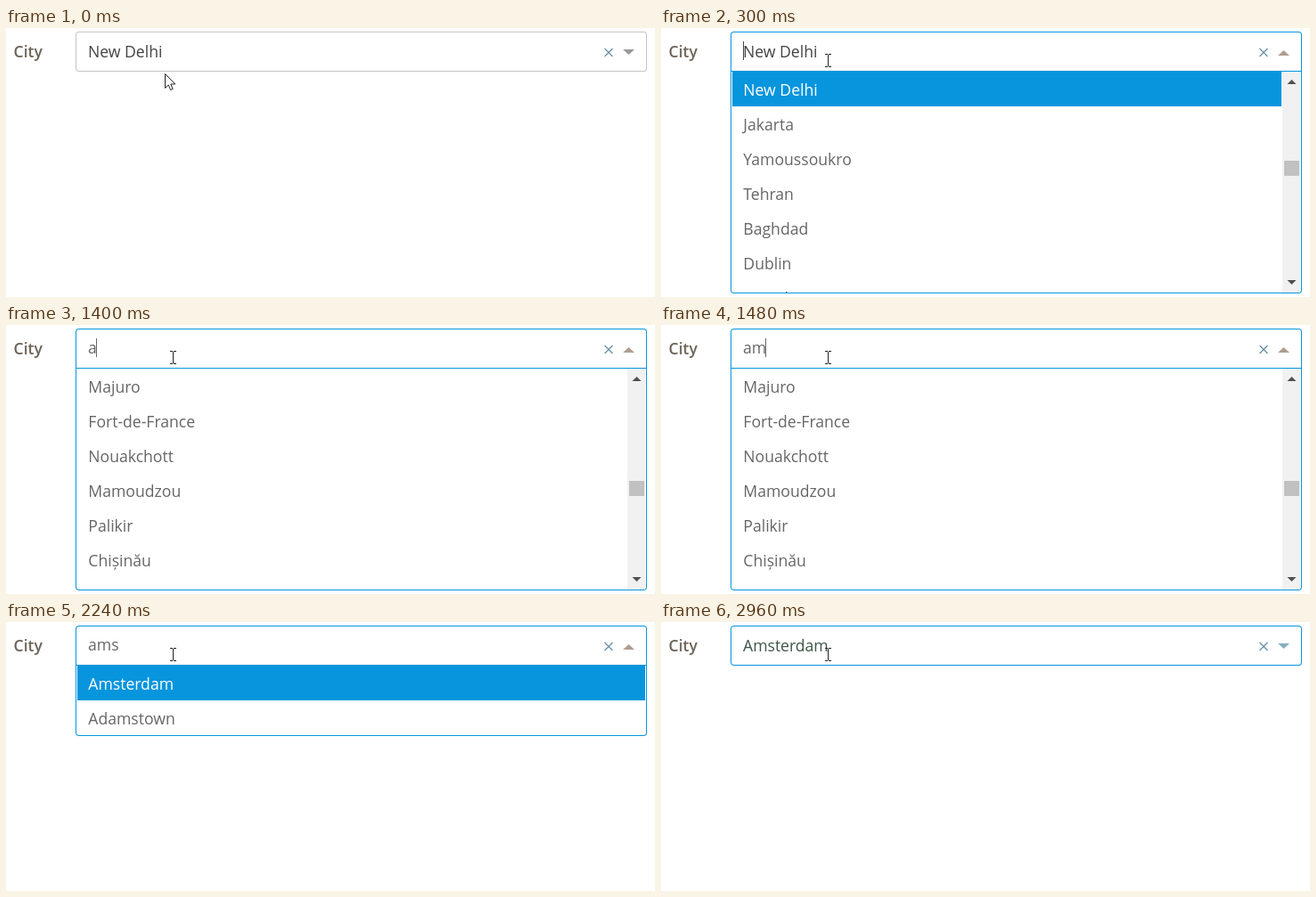
An HTML page with a canvas for the animation above (3.57 s loop, 728 by 302 pixels).

```html
<!DOCTYPE html>
<html lang="en">
<head>
<meta charset="utf-8">
<title>City select</title>
<style>
html, body { margin: 0; height: 100%; overflow: hidden; background: #fff; }
canvas { display: block; }
</style>
</head>
<body>
<canvas width="728" height="302"></canvas>
<script>
const ctx = document.querySelector('canvas').getContext('2d');
const LOOP = 3570;
const BLUE = '#0795dd';
const FONT = '17.6px "Open Sans", sans-serif';
const ROW = 39, LIST_TOP = 49;

const nearby = ['New Delhi', 'Jakarta', 'Yamoussoukro', 'Tehran', 'Baghdad', 'Dublin', 'Zagreb'];
const withA = ['Majuro', 'Fort-de-France', 'Nouakchott', 'Mamoudzou', 'Palikir', 'Chișinău'];
const matches = ['Amsterdam', 'Adamstown'];

// Each step overrides part of the state that came before it.
const steps = [
  [0, { value: 'New Delhi', ink: '#444', border: '#c4c4c4', arrow: '#999', pointer: [178, 51] }],
  [70, { pointer: null, beam: [181, 46] }],
  [150, { beam: [184, 41] }],
  [220, { beam: [187, 36] }],
  [300, { border: BLUE, arrow: '#b09d8e', caret: true,
          list: nearby, bottom: 297, thumb: 149, selected: true }],
  [850, { caret: false }],
  [1400, { value: 'a', typed: true, ink: '#666', caret: true, list: withA, thumb: 175, selected: false }],
  [1480, { value: 'am' }],
  [1710, { value: 'ams', list: matches, bottom: 127, thumb: 0, selected: true }],
  [2240, { caret: false }],
  [2720, { underline: true }],
  [2790, { caret: true }],
  [2960, { value: 'Amsterdam', ink: '#3f5548', typed: false, underline: false, caret: false,
           list: null, arrow: '#86aebf' }]
];

function stateAt(time) {
  return Object.assign({}, ...steps.filter(([start]) => start <= time).map(([, change]) => change));
}

function rect(x, y, w, h, color, radius = 0) {
  ctx.fillStyle = color;
  ctx.beginPath();
  ctx.roundRect(x, y, w, h, radius);
  ctx.fill();
}

function text(str, x, y, color, weight = 400) {
  ctx.font = `${weight} ${FONT}`;
  ctx.fillStyle = color;
  ctx.fillText(str, x, y);
}

// Triangle with a horizontal base at y; a negative height points up.
function triangle(x, y, halfWidth, height, color) {
  ctx.fillStyle = color;
  ctx.beginPath();
  ctx.moveTo(x - halfWidth, y);
  ctx.lineTo(x + halfWidth, y);
  ctx.lineTo(x, y + height);
  ctx.fill();
}

function stroke(path, color, width = 1) {
  ctx.strokeStyle = color;
  ctx.lineWidth = width;
  ctx.stroke(new Path2D(path));
}

function drawFrame(s) {
  const height = (s.list ? s.bottom : 48) - 3;
  rect(78, 4, 641, height, s.border, 4);
  rect(79, 5, 639, height - 2, '#fff', 3);
  if (s.list) rect(79, 48, 639, 1, s.border);
}

function drawList(s) {
  const right = s.thumb ? 696 : 717;
  ctx.save();
  ctx.beginPath();
  ctx.rect(80, LIST_TOP, 637, s.bottom - LIST_TOP);
  ctx.clip();
  if (s.selected) rect(80, LIST_TOP, right - 80, ROW, BLUE);
  s.list.forEach((city, i) =>
    text(city, 92.3, 76 + i * ROW, s.selected && !i ? '#fff' : '#666'));
  if (s.thumb) {
    rect(697, LIST_TOP, 20, 248, '#f1f1f1');
    rect(699, s.thumb, 17, 17, '#c1c1c1');
    triangle(707.5, 63, 5, -5, '#505050');
    triangle(707.5, 283, 5, 5, '#505050');
  }
  ctx.restore();
}

function drawField(s) {
  text('City', 8.5, 33, '#6d6458', 600);
  text(s.value, 92, s.typed ? 32 : 33, s.ink);
  if (s.caret) {
    const offset = s.typed ? ctx.measureText(s.value).width : 0;
    rect(Math.max(92, Math.floor(91.4 + offset)), 15, 1, 21, s.ink);
  }
  if (s.underline) {
    ctx.setLineDash([3, 2]);
    stroke('M92 35.5H126', '#777');
    ctx.setLineDash([]);
  }
  stroke('M671.5 23l9 9m0-9l-9 9', '#6b93a8', 1.3);
  if (s.list) triangle(698.5, 31, 6.5, -6, s.arrow);
  else triangle(698.5, 24, 6.5, 6, s.arrow);
}

function drawCursor({ pointer, beam }) {
  const [x, y] = pointer || beam;
  ctx.save();
  ctx.translate(x + .5, y + .5);
  if (pointer) {
    const shape = 'M0 0V16L3.7 12.5L6.2 18L8.7 17L6.3 11.5H11.3Z';
    ctx.fillStyle = '#fff';
    ctx.fill(new Path2D(shape));
    stroke(shape, '#222');
  } else {
    stroke('M-3.5-7H-.5M.5-7H3.5M0-6.5V6.5M-3.5 7H-.5M.5 7H3.5', '#222');
  }
  ctx.restore();
}

function render(now) {
  const s = stateAt(now % LOOP);
  rect(0, 0, 728, 302, '#fff');
  drawFrame(s);
  if (s.list) drawList(s);
  drawField(s);
  drawCursor(s);
}

const start = performance.now();
(function tick() {
  render(performance.now() - start);
  requestAnimationFrame(tick);
})();
</script>
</body>
</html>
```
